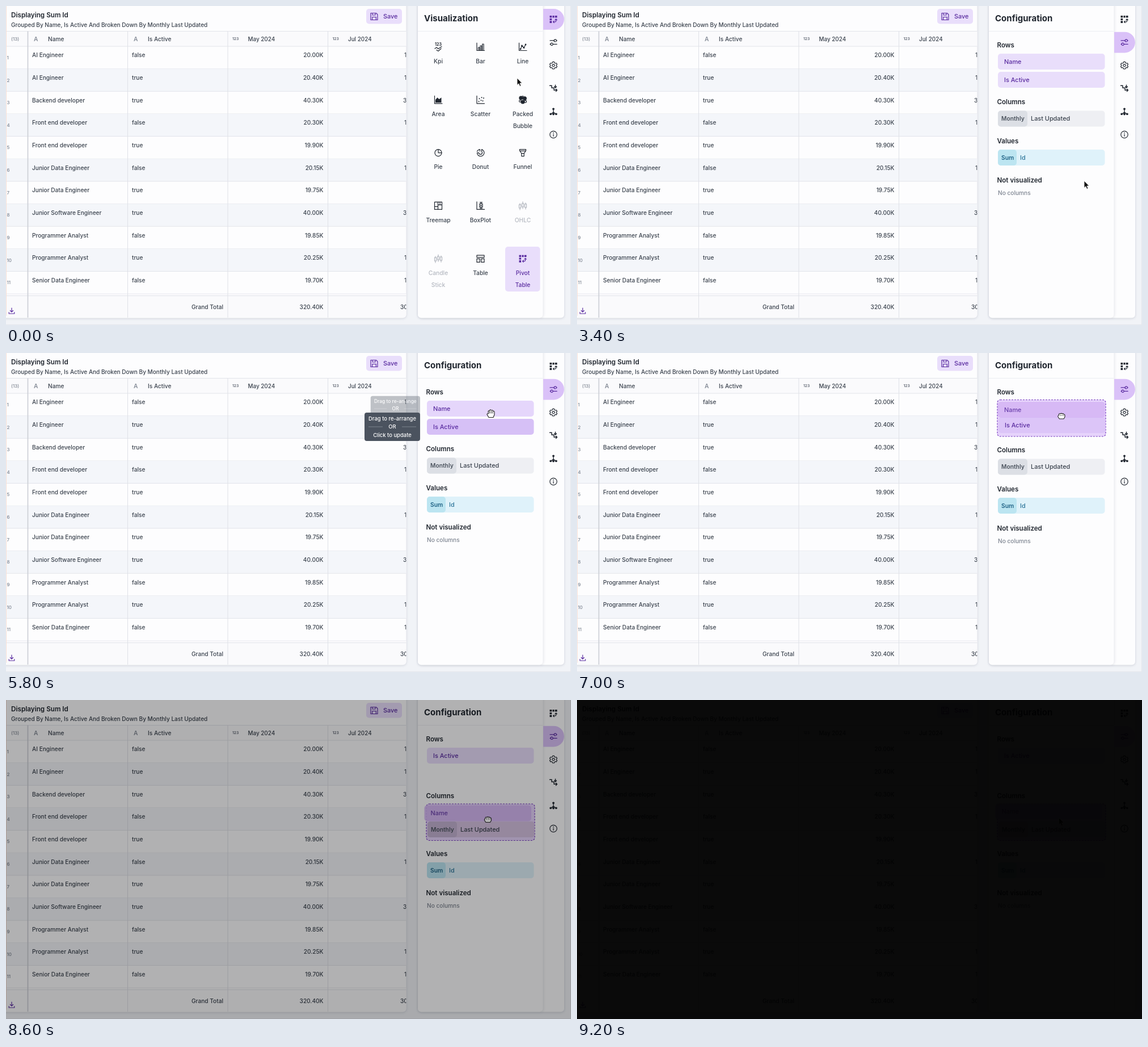
These frames come from a looping animation (996 px wide and 562 px high, 9600 ms). An HTML page:

```html
<!DOCTYPE html>
<html lang="en">
<head>
<meta charset="utf-8">
<title>Pivot table configuration</title>
<style>
  html, body { margin: 0; width: 100%; height: 100%; overflow: hidden; background: #f1f3f7; }
  svg { display: block; width: 100vw; height: 100vh; font-family: Inter, Roboto, sans-serif; }
  text { white-space: pre; }
  .card { filter: drop-shadow(0 1px 2px rgba(30, 40, 70, .16)); }
  .ico { fill: none; stroke: currentColor; stroke-width: 1.2; stroke-linejoin: round; stroke-linecap: round; }
  .ico .f { fill: currentColor; stroke: none; }
</style>
</head>
<body>
<svg id="stage" viewBox="0 0 996 562">
  <defs><clipPath id="tableClip"><rect x="0" y="-10" width="705.5" height="559.5" rx="6"/></clipPath></defs>
  <g id="table"></g>
  <g id="panel"></g>
  <rect id="fade" width="996" height="562" fill="#000" opacity="0"/>
</svg>
<script>
const LOOP = 9600, STEP = 200;
const INK = '#3a424d', DARK = '#20262f', GREY = '#7d8490', PURPLE = '#5a2ca0', LILAC = '#e9defb', TAB = '#dac1f8';
const $ = id => document.getElementById(id);

const text = (x, y, s, size = 10.15, o = {}) =>
  `<text x="${x}" y="${y + size * .36}" font-size="${size}" font-weight="${o.w || 500}" ` +
  `fill="${o.c || INK}" text-anchor="${o.a || 'start'}">${s}</text>`;
const rect = (x, y, w, h, fill, r = 0, more = '') =>
  `<rect x="${x}" y="${y}" width="${w}" height="${h}" rx="${r}" fill="${fill}" ${more}/>`;
const line = (x1, y1, x2, y2, c = '#e2e4ea', w = 1) =>
  `<path d="M${x1} ${y1}L${x2} ${y2}" stroke="${c}" stroke-width="${w}"/>`;

// Icons are drawn around their centre
const p = (d, more = '') => `<path d="${d}" ${more}/>`;
const fill = d => p(d, 'class="f"');
const dots = (list, r) => list.map(([x, y]) => `<circle cx="${x}" cy="${y}" r="${r}" class="f"/>`).join('');
const AXIS = p('M-6.5-7V6.5H7');
const CANDLES = p('M-5-4V-2M-5 4V7M-6.5-2h3v6h-3zM0-7V-4M0 2V5M-1.5-4h3v6h-3zM5-5V-3M5 3V6M3.5-3h3v6h-3z');
const ICONS = {
  kpi: '<text y="-2" font-size="7" font-weight="700" text-anchor="middle" fill="currentColor" stroke="none">123</text>' +
    p('M-6 3L-3 1 0 3.5 6-.5M-3 5.5L0 7.5 5 3'),
  bar: AXIS + p('M-4 6.5V1h2.4v5.5M-.5 6.5V-2h2.4v8.5M3.2 6.5V-5h2.4V6.5'),
  line: AXIS + p('M-4 4L-1.5-2 2 1.5 5-4') + dots([[-4, 4], [-1.5, -2], [2, 1.5], [5, -4]], 1.4),
  area: AXIS + fill('M-5 5V0L-1.5-4 1.5-1 5.5-4V5z'),
  scatter: AXIS + dots([[-3, 3], [-2, -2], [1, 1], [2, -4], [4, 2], [5.5, -3]], 1),
  bubble: dots([[-3.2, -3.2], [3.4, -2.6], [0, 3.6]], 3.5) + '<circle cx="-4.6" cy="2.3" r="1.8"/><circle cx="4.6" cy="3" r="1.9"/><circle cx="0" cy="-5.6" r="1.2"/>',
  pie: '<circle r="6"/>' + p('M0-6V0H6'),
  donut: p('M2-6A6.2 6.2 0 1 1-6 0H-3A3 3 0 1 0 2-2.4zM-6-2.2A6 6 0 0 1-1-6V-2.8'),
  funnel: p('M-5.5-6h11v2.4L2.2 1V6h-4.4V1L-5.5-3.6zM-5-3.2H5M-2 1h4'),
  treemap: p('M-6.5-6.5h13v13h-13zM-.5-6.5v13M-6.5 1.5h6M-.5-1.5h7M3-6.5v5'),
  box: AXIS + p('M1-6V-3.5M1 2.5V4.8M-1-6h4M-1 4.8h4M-1.5-3.5h5v6h-5z') + dots([[1, -.5]], 1.2),
  candles: CANDLES,
  table: p('M-6.5-6h13v3.6h-13zM-6.5.2h5.2v6h-5.2zM1.3.2h5.2v6H1.3z'),
  pivot: fill('M-6.5-6.5h3.6v3.6h-3.6zM-1.6-6.5h3.2v3.6h-3.2zM2.8-6.5h3.7v3.6H2.8zM-6.5-1.6h3.6v3.2h-3.6zM-6.5 2.8h3.6v3.7h-3.6z') +
    p('M4.6-.5V2.4Q4.6 4.5 2.4 4.5H-.4M2.9 1L4.6-.7 6.3 1M1.2 2.8L-.5 4.5 1.2 6.2'),
  sliders: p('M-6-3.2H1M5.6-3.2H6.2M-6 3.2H-5M-.8 3.2H6.2') + '<circle cx="3.2" cy="-3.2" r="2.1"/><circle cx="-2.9" cy="3.2" r="2.1"/>',
  gear: '<circle r="2.1"/>' + p('M-1.4-6.3h2.8l.5 1.8 1.4.8 1.8-.5 1.4 2.4-1.3 1.3v1l1.3 1.3-1.4 2.4-1.8-.5-1.4.8-.5 1.8h-2.8l-.5-1.8-1.4-.8-1.8.5-1.4-2.4 1.3-1.3v-1l-1.3-1.3 1.4-2.4 1.8.5 1.4-.8z'),
  steps: p('M-6.5-5h3.5v4h4v4h5.5M4.4 1L6.5 3 4.4 5.2M3.5-6V-1.5M1.7-3.2L3.5-1.4 5.3-3.2', 'stroke-width="1.5"'),
  tree: p('M0-4V1L-4.5 4.5M0 1L4.5 4.5M0 1V5', 'stroke-width="1.3"') + dots([[0, -4.6], [-4.8, 4.4], [0, 4.6], [4.8, 4.4]], 1.9),
  info: '<circle r="6.2"/>' + p('M0-.5V3') + dots([[0, -2.9]], .9),
  save: p('M-6-6H3.5L6-3.5V6H-6zM-3-6v3.5h5V-6M-3.3 6V1h6.6v5'),
  load: p('M0-5V2M-2.6-.5L0 2.1 2.6-.5M-4.8 2.5V5H4.8V2.5')
};
const icon = (name, x, y, c = DARK) =>
  `<g class="ico" color="${c}" transform="translate(${x} ${y})">${ICONS[name]}</g>`;

const ROWS = [
  ['AI Engineer', false, '20.00K', 1], ['AI Engineer', true, '20.40K', 1],
  ['Backend developer', true, '40.30K', 3], ['Front end developer', false, '20.30K', 1],
  ['Front end developer', true, '19.90K', ''], ['Junior Data Engineer', false, '20.15K', 1],
  ['Junior Data Engineer', true, '19.75K', ''], ['Junior Software Engineer', true, '40.00K', 3],
  ['Programmer Analyst', false, '19.85K', ''], ['Programmer Analyst', true, '20.25K', 1],
  ['Senior Data Engineer', false, '19.70K', 1]
];

function drawTable() {
  const END = { a: 'end' };
  let s = rect(0, 0, 996, 562, '#f1f3f7') + line(995.5, 0, 995.5, 562, '#e4e6ec') + line(0, 561.5, 996, 561.5, '#e4e6ec');
  s += rect(-8, -10, 713.5, 559.5, '#fdfdfe', 6, 'class="card"') + '<g clip-path="url(#tableClip)">';
  s += rect(0, 44.5, 706, 26.5, '#fafafc') + line(0, 44.5, 706, 44.5) + line(0, 71, 706, 71);
  ROWS.forEach(([name, active, sum, next], i) => {
    const top = 71 + 39.65 * i, y = top + 15.7;
    if (i % 2) s += rect(0, top, 706, 39.65, '#f4f6fa');
    s += line(0, top + 39.65, 706, top + 39.65) + text(1.5, top + 20, i + 1, 8, { c: GREY });
    s += text(46, y, name) + text(222, y, active) + text(559.5, y, sum, 10.1, END) + text(next === 1 ? 702 : 700, y, next);
  });
  s += rect(0, 507.5, 706, 42, '#fafafc') + line(0, 510.5, 706, 510.5);
  s += text(383, 530, 'Grand Total', 10.15, END) + text(559.5, 530, '320.40K', 10.1, END) + text(695, 530, '30');
  s += line(38.5, 44.5, 38.5, 549, '#cbced5', 1.6);
  for (const x of [214.5, 391, 567.5]) s += line(x, 44.5, x, 549, '#dfe1e7');
  s += text(9, 58, '(13)', 8, { c: GREY });
  for (const [x, label] of [[49, 'Name'], [225, 'Is Active']])
    s += text(x, 58, 'A', 10.5, { c: GREY }) + text(x + 25, 58, label);
  for (const [x, label] of [[399, 'May 2024'], [575.5, 'Jul 2024']])
    s += text(x, 57.5, '123', 6.8, { c: '#5d6470', w: 600 }) + text(x + 27.5, 58, label, 9.9);
  s += line(.5, 0, .5, 549, '#f8e0d6') + '</g>' + icon('load', 10, 537, PURPLE);
  s += text(9, 15.5, 'Displaying Sum Id', 11.7, { w: 600, c: DARK });
  s += text(9, 33, 'Grouped By Name, Is Active And Broken Down By Monthly Last Updated', 10.05);
  s += rect(635, 5, 63, 26.5, LILAC, 5) + icon('save', 649, 18.5, PURPLE) + text(665, 18.5, 'Save', 10.9, { c: PURPLE });
  $('table').innerHTML = s;
}

const CHARTS = [
  ['kpi', 'Kpi'], ['bar', 'Bar'], ['line', 'Line'],
  ['area', 'Area'], ['scatter', 'Scatter'], ['bubble', 'Packed', 'Bubble'],
  ['pie', 'Pie'], ['donut', 'Donut'], ['funnel', 'Funnel'],
  ['treemap', 'Treemap'], ['box', 'BoxPlot'], ['candles', 'OHLC'],
  ['candles', 'Candle', 'Stick'], ['table', 'Table'], ['pivot', 'Pivot', 'Table']
];
const RAIL = ['pivot', 'sliders', 'gear', 'steps', 'tree', 'info'];

function frame(title, tab) {
  let s = rect(726, -10, 258, 559.5, '#fdfdfe', 6, 'class="card"');
  s += rect(726, -10, 220.5, 559.5, '#fdfdfe', 6, 'style="filter:drop-shadow(1px 0 2px rgba(30,40,70,.12))"');
  s += line(726, 44.5, 946, 44.5, '#eceef2') + text(737, 21.5, title, 15, { w: 700, c: DARK });
  const y = 5 + 40.7 * tab;
  s += `<path d="M947 ${y}h18.5a18.4 18.4 0 0 1 0 36.8h-18.5z" fill="${TAB}"/>`;
  RAIL.forEach((n, i) => s += icon(n, 965, 23.5 + 40.6 * i, i === tab ? PURPLE : DARK));
  return s;
}

function gallery() {
  let s = frame('Visualization', 0) + rect(880, 424, 61.5, 79, LILAC, 5);
  CHARTS.forEach(([name, ...label], i) => {
    const x = 762 + 74.5 * (i % 3), y = 72 + 93.3 * Math.floor(i / 3);
    const c = name === 'pivot' ? PURPLE : name === 'candles' ? '#b4b8c0' : DARK;
    s += icon(name, x, y, c);
    label.forEach((l, k) => s += text(x, y + 25 + 21.3 * k, l, 10.25, { a: 'middle', c: c === DARK ? INK : c }));
  });
  return s;
}

const chip = (x, y, bg, label, c = PURPLE, tag) => {
  const mid = y + 14;
  let s = rect(x, y, 188.5, 28, bg, 5);
  if (tag) s += rect(x, y, tag.w, 28, tag.bg, 5) + text(x + 6, mid, tag.s, 10.25, { w: 600, c: tag.c });
  return s + text(x + (tag ? tag.w + 6 : 11), mid, label, 10.9, { c });
};
const zone = y => rect(741, y, 191, 64.5, '#e6d3fb', 5, 'stroke="#7a3fc2" stroke-width="1.2" stroke-dasharray="3 2"');

const tip = (cy, opacity, scale) => `<g transform="translate(730 ${cy}) scale(${scale})" opacity="${opacity}">` +
  rect(-98, -25, 98, 50, '#4b535f', 4) + line(-91, 0, -66, 0, '#7d848e') + line(-32, 0, -7, 0, '#7d848e') +
  ['Drag to re-arrange', 'OR', 'Click to update'].map((l, i) =>
    text(-49, 14.5 * (i - 1), l, 9.45, { a: 'middle', c: '#fff' })).join('') + '</g>';

// Pointer path: time, x, y
const PATH = [
  [0, 901, 127], [200, 904, 123], [600, 936, 88], [1000, 962, 62], [1400, 962, 62], [1600, 969, 61],
  [2200, 960, 74], [2400, 960, 74], [2800, 938, 160], [3200, 904, 284], [3400, 894, 308], [3800, 892, 302],
  [4400, 880, 220], [5000, 866, 158], [5200, 861, 135], [5600, 857, 128], [5800, 855, 107], [6200, 854, 106],
  [7000, 854, 111], [7400, 853, 117], [7800, 852, 170], [8200, 850, 211], [8400, 850, 214], [8800, 849, 207], [9600, 850, 208]
];
function pointerAt(t) {
  const i = PATH.findIndex(k => k[0] > t), [t0, x0, y0] = PATH[i - 1], [t1, x1, y1] = PATH[i];
  const u = (t - t0) / (t1 - t0);
  return [x0 + (x1 - x0) * u, y0 + (y1 - y0) * u];
}

const CURSORS = {
  arrow: '<path d="M0 0V12.4L2.8 9.8 4.9 14.4 7 13.4 5 9H8.8Z" fill="#111" stroke="#fff" stroke-width=".8"/>',
  open: '<path d="M-4 6.5L-7 1.2Q-7.2-.8-4.6 0L-5-4Q-4.4-6-3-4.6L-2.4-6.2Q-1-7.6.2-6.2L1-6Q2.8-6.8 3.2-5L4-4.6Q6-5 6 -3V1.5L4 6.5Z" fill="#fff" stroke="#222" stroke-width="1.1"/><path d="M-2.6-4V-.5M.2-5V-.5M3-4.4V-.5" stroke="#222"/>',
  fist: '<path d="M-3.6 5L-6 1.5Q-6.6-.8-4.6-1.2V-3Q-3.6-5-2-3.8 0-5.4 1.4-3.8 3.2-4.8 4-3 6-3.4 6-1V1.8L4 5Z" fill="#fff" stroke="#222" stroke-width="1.1"/><path d="M-2-2V-.2M1-2V-.2M3.7-1.6V-.2" stroke="#222"/>'
};

function config(t, x, y) {
  const over = t < 6400 ? '' : t < 7800 ? 'rows' : 'cols';
  const shift = over === 'rows' ? 2 : 0, low = over === 'cols' ? 33 : shift;
  const head = (cy, s) => text(740.5, cy, s, 11.6, { w: 600, c: DARK });
  let s = frame('Configuration', 1) + head(69, 'Rows') + head(169 + shift, 'Columns') +
    head(238 + low, 'Values') + head(307 + low, 'Not visualized') +
    text(742, 329.5 + low, 'No columns', 10.15, { c: GREY });

  if (over === 'rows') {
    s += zone(82.5) + chip(743, 113, '#dcc5f8', 'Is Active');
  } else if (over === 'cols') {
    s += chip(742, 84, LILAC, 'Is Active') + zone(183);
  } else {
    const onActive = t >= 5200 && t <= 5800;
    s += chip(742, 84, t >= 6000 ? '#d6c0f6' : t === 5800 ? '#e5d6fb' : LILAC, 'Name');
    s += chip(742, 116, onActive ? '#d6c0f6' : LILAC, 'Is Active');
  }
  const inZone = over === 'cols';
  s += chip(inZone ? 743 : 742, inZone ? 214 : 184.5 + shift, inZone ? '#d6c2e2' : '#eeeff3', 'Last Updated', INK,
    { s: 'Monthly', w: 52, bg: inZone ? '#c4b3d2' : '#dcdfe5', c: '#4a525d' });
  s += chip(742, 253 + low, '#dff2fa', 'Id', '#2b7499', { s: 'Sum', w: 33, bg: '#bce5f1', c: '#1f6285' });

  if (over) s += `<g opacity=".88">${chip(x - 112, y - 25, '#d5b6f5', 'Name')}</g>`;
  if (t >= 5800 && t < 6400) s += t === 5800 ? tip(98, .35, .89) : tip(98, 1, 1);
  if (t >= 5200 && t <= 5800) s += t === 5200 ? tip(130, .35, .89) : tip(130, 1, 1);
  return s;
}

const FADE = { 8600: .3, 8800: .58, 9000: .8 };

function draw(t) {
  const [x, y] = pointerAt(t);
  const kind = t < 5200 || t >= 9200 ? 'arrow' : t < 6400 ? 'open' : 'fist';
  $('panel').innerHTML = (t < 1600 ? gallery() : config(t, x, y)) +
    `<g transform="translate(${x} ${y})" stroke-linejoin="round">${CURSORS[kind]}</g>`;
  $('fade').setAttribute('opacity', t >= 9200 ? .96 : FADE[t] || 0);
}

drawTable();
const start = performance.now();
let shown = -1;
function tick() {
  const t = Math.floor((performance.now() - start) % LOOP / STEP) * STEP;
  if (t !== shown) draw(shown = t);
  requestAnimationFrame(tick);
}
tick();
</script>
</body>
</html>
```
